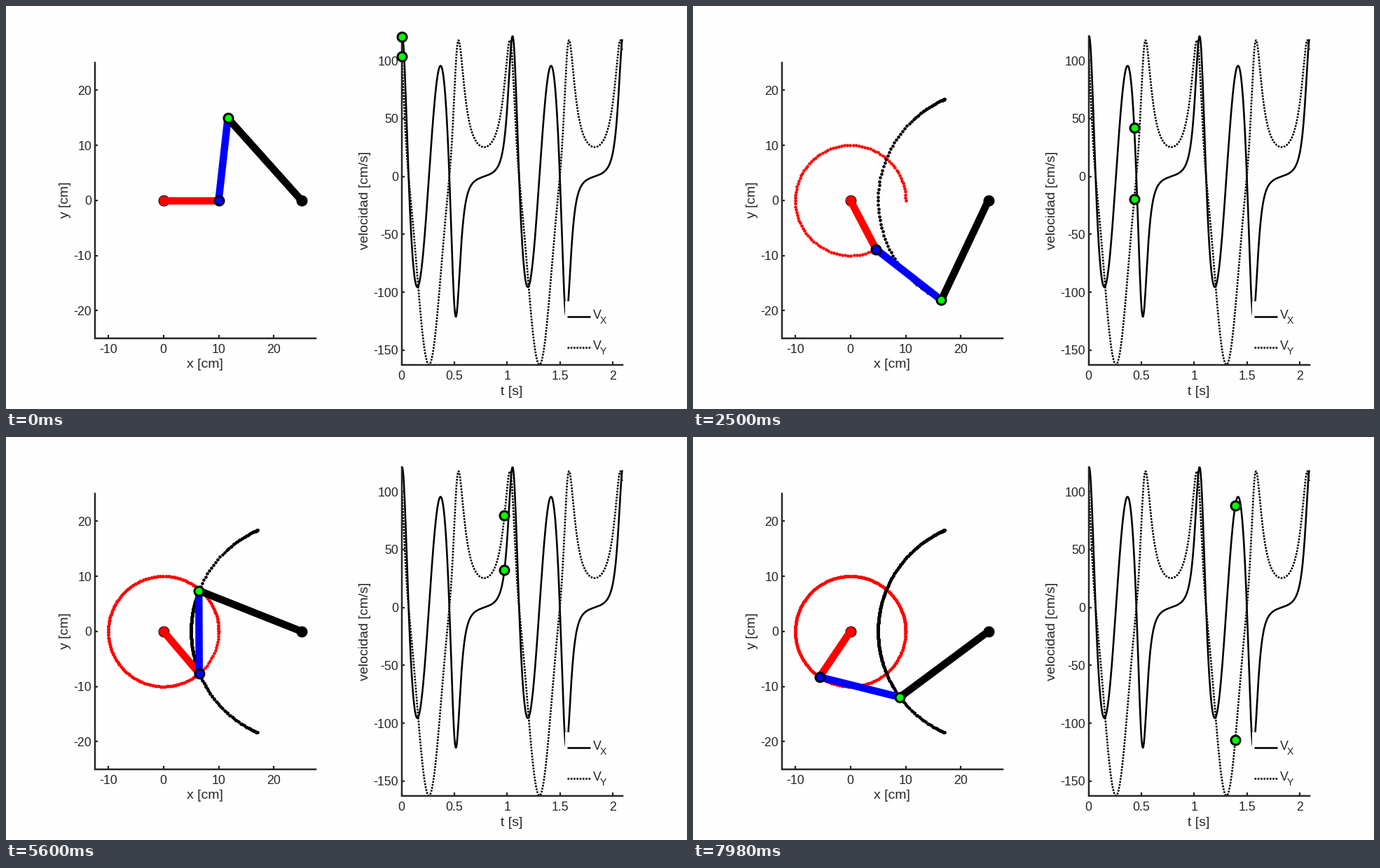
These frames come from a looping animation (972 px wide and 576 px high, 8000 ms). A matplotlib script:

```python
import numpy as np
import matplotlib.pyplot as plt
from matplotlib.animation import FuncAnimation
from matplotlib.patches import Rectangle

W, H, DPI = 972, 576, 100
PX = 72 / DPI                      # points per pixel
FRAMES, STEP_MS = 320, 25
INK, PAPER = "#262626", "#fdfefd"
TICK, LABEL = 17.7, 19.5           # font sizes in pixels

plt.rcParams["font.family"] = "Liberation Sans"

# Four-bar linkage: crank, coupler, rocker and ground lengths in cm
CRANK, COUPLER, ROCKER, GROUND = 10, 15, 20, 25
OMEGA = 12
t = np.linspace(0, 2 * np.pi / 3, 480)
theta = OMEGA * t


def linkage(theta):
    """Positions of the crank pin and of the coupler-rocker joint."""
    bx, by = CRANK * np.cos(theta), CRANK * np.sin(theta)
    dist = np.hypot(bx - GROUND, by)
    cos_g = (dist**2 + ROCKER**2 - COUPLER**2) / (2 * ROCKER * dist)
    gamma = np.arccos(np.clip(cos_g, -1, 1))
    side = np.where(np.cos(theta / 2) >= 0, 1, -1)
    ang = np.arctan2(by, bx - GROUND) - side * gamma
    return bx, by, GROUND + ROCKER * np.cos(ang), ROCKER * np.sin(ang)


def plane(x, y):
    return 224.7 + 7.88 * np.asarray(x), 277.8 - 7.88 * np.asarray(y)


def chart(time, v):
    return 564.6 + 150.6 * np.asarray(time), 243.6 - 1.6555 * np.asarray(v)


bx, by, cx, cy = linkage(theta)
vx, vy = np.diff(cx) / np.diff(t), np.diff(cy) / np.diff(t)
pin, joint = plane(bx, by), plane(cx, cy)
ground = plane(GROUND, 0)
origin = plane(0, 0)
curve_x, curve_y = chart(t[:-1], vx), chart(t[:-1], vy)

fig = plt.figure(figsize=(W / DPI, H / DPI), dpi=DPI, facecolor=PAPER)
ax = fig.add_axes([0, 0, 1, 1])
ax.set_xlim(0, W)
ax.set_ylim(H, 0)
ax.axis("off")


def line(x, y, color, width, z, **kw):
    return ax.plot(x, y, color=color, lw=width * PX, zorder=z, **kw)[0]


def dots(face, size, z, edge="black", edge_width=0.0):
    return ax.plot([], [], "o", ms=size * PX, mfc=face, mec=edge,
                   mew=edge_width * PX, zorder=z)[0]


def text(x, y, s, size=TICK, ha="center", z=6, **kw):
    ax.text(x, y, s, fontsize=size * PX, color=INK, ha=ha, va="baseline",
            zorder=z, **kw)


def frame(left, top, right, bottom):
    line([left, left, right], [top, bottom, bottom], INK, 2.5, 4,
         solid_capstyle="projecting", solid_joinstyle="miter")


def x_tick(x, bottom, s, base):
    line([x, x], [bottom, bottom - 4.5], INK, 2.2, 4, solid_capstyle="butt")
    text(x, base, s)


def y_tick(left, y, s):
    line([left, left + 4.5], [y, y], INK, 2.2, 4, solid_capstyle="butt")
    text(left - 4.5, y + 6.5, s, ha="right")


def side_label(x, y, s):
    text(x, y, s, LABEL, rotation=90, rotation_mode="anchor")


# Mechanism axes
frame(126.5, 80.5, 441.8, 474.8)
for v in (-10, 0, 10, 20):
    x_tick(plane(v, 0)[0], 474.8, str(v), 496.5)
for v in (-20, -10, 0, 10, 20):
    y_tick(126.5, plane(0, v)[1], str(v))
text(284, 517, "x [cm]", LABEL)
side_label(88.5, 277.5, "y [cm]")

# Velocity axes
frame(564.6, 43, 880, 512.5)
for v in (0, 0.5, 1, 1.5, 2):
    x_tick(chart(v, 0)[0], 512.5, f"{v:g}", 534.5)
for v in range(-150, 101, 50):
    y_tick(564.6, chart(0, v)[1], str(v))
text(722, 555.5, "t [s]", LABEL)
side_label(516.5, 278, "velocidad [cm/s]")

DOTTED = (0, (1.0, 0.65))
area = Rectangle((563.5, 42), 317.5, 471, transform=ax.transData)
for pts, style in ((curve_x, "-"), (curve_y, DOTTED)):
    c = line(*pts, "black", 2.6, 3, ls=style, dash_capstyle="butt")
    c.set_clip_path(area)

# Legend
ax.add_patch(Rectangle((797.5, 422), 78, 85, fc=PAPER, ec="none", zorder=5))
for y, style, sub in ((443.5, "-", "X"), (487.5, DOTTED, "Y")):
    line([801, 834], [y, y], "black", 2.6, 6, ls=style,
         solid_capstyle="butt", dash_capstyle="butt")
    text(837.5, y + 3.5, "V", ha="left")
    text(847.3, y + 11, sub, TICK * 0.8, ha="left")

# Moving parts
trail_pin = dots("red", 4.6, 7)
trail_joint = dots("black", 4.6, 7)
pivot = dots("red", 15, 8, edge_width=1)
pivot.set_data([origin[0]], [origin[1]])
anchor = dots("black", 15, 11, edge_width=1)
anchor.set_data([ground[0]], [ground[1]])
crank = line([], [], "red", 10.5, 9)
coupler = line([], [], "blue", 10.5, 10, solid_capstyle="butt")
rocker = line([], [], "black", 10.5, 10, solid_capstyle="butt")
pin_dot = dots("blue", 13, 12, edge_width=3)
joint_dot = dots("lime", 13, 12, edge_width=3)
speed_dots = dots("lime", 13, 12, edge_width=3)


def link(artist, a, b):
    artist.set_data([a[0], b[0]], [a[1], b[1]])


def update(k):
    i = max(k - 1, 0)
    b, c = (pin[0][i], pin[1][i]), (joint[0][i], joint[1][i])
    trail_pin.set_data(pin[0][:i + 1], pin[1][:i + 1])
    trail_joint.set_data(joint[0][:i + 1], joint[1][:i + 1])
    link(crank, origin, b)
    link(coupler, b, c)
    link(rocker, c, ground)
    pin_dot.set_data([b[0]], [b[1]])
    joint_dot.set_data([c[0]], [c[1]])
    speed_dots.set_data([curve_x[0][i]] * 2, [curve_x[1][i], curve_y[1][i]])
    return ()


anim = FuncAnimation(fig, update, frames=FRAMES, interval=STEP_MS,
                     init_func=lambda: update(0), repeat=True,
                     repeat_delay=0, blit=False)
plt.show()
```
